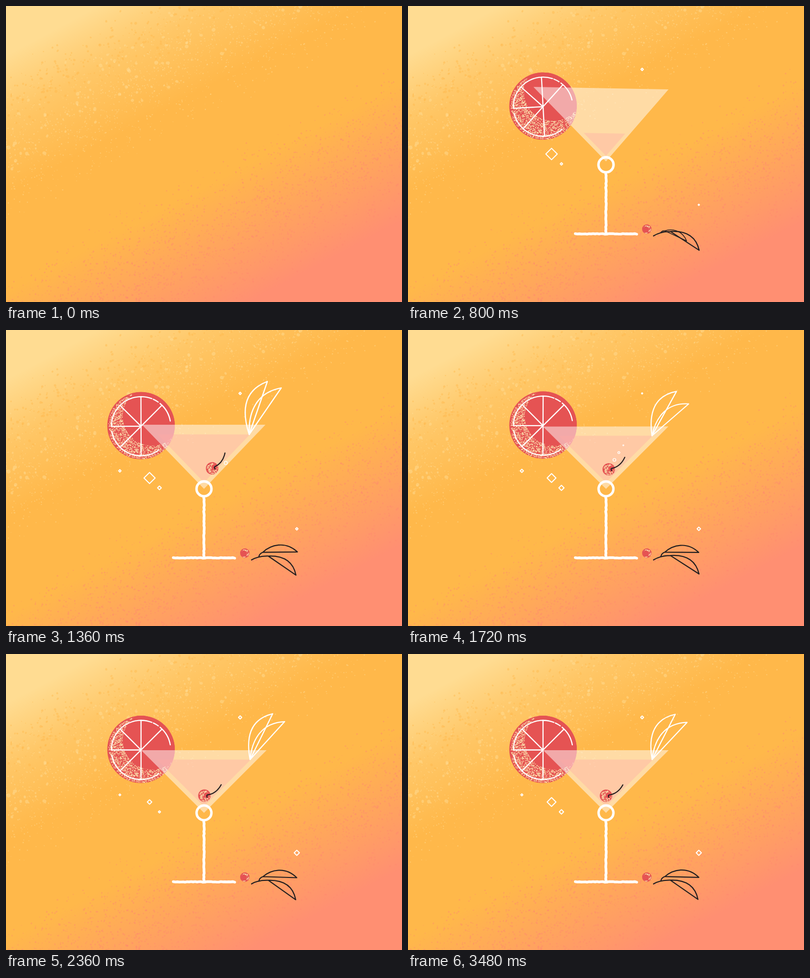
Animation of 800x600 px, one loop 3.52 s. Source, as an HTML page with a canvas:

```html
<!DOCTYPE html>
<html lang="en">
<head>
<meta charset="utf-8">
<title>Cocktail</title>
<style>
html, body { margin: 0; width: 100%; height: 100%; overflow: hidden; background: #ffb84a; }
canvas, svg { position: absolute; left: 0; top: 0; width: 800px; height: 600px; display: block; }
</style>
</head>
<body>
<canvas id="bg" width="800" height="600"></canvas>
<svg id="stage" viewBox="0 0 800 600" fill="none" stroke-linecap="round" stroke-linejoin="round"></svg>
<script>
const LOOP = 3520, RED = '#e55353', INK = '#231f20', PALE = '#fbdcaa', WHITE = '#fff';
const stage = document.getElementById('stage');

function seeded(s) {
  return () => {
    s = (s + 0x6d2b79f5) | 0;
    let r = Math.imul(s ^ (s >>> 15), 1 | s);
    r = (r + Math.imul(r ^ (r >>> 7), 61 | r)) ^ r;
    return ((r ^ (r >>> 14)) >>> 0) / 4294967296;
  };
}

const clamp = (x, lo, hi) => Math.max(lo, Math.min(hi, x));
const mix = (a, b, u) => a + (b - a) * u;
function ramp(t, from, to) {
  const u = clamp((t - from) / (to - from), 0, 1);
  return u * u * (3 - 2 * u);
}
// Goes from 0 to 1 with a damped swing
function spring(t, from, decay, speed) {
  const u = Math.max(0, t - from) / 1000;
  return 1 - Math.exp(-decay * u) * Math.cos(speed * u);
}
const wave = (t, peak, period) => Math.cos(2 * Math.PI * (t - peak) / period);

function set(el, attrs) {
  for (const k in attrs) el.setAttribute(k, attrs[k]);
  return el;
}
function add(tag, attrs = {}, parent = stage) {
  const el = document.createElementNS('http://www.w3.org/2000/svg', tag);
  parent.appendChild(el);
  return set(el, attrs);
}
function show(el, on) { el.style.display = on ? '' : 'none'; }
function place(el, x, y, rot, scale) {
  show(el, scale > 0.01);
  el.setAttribute('transform', `translate(${x} ${y}) rotate(${rot}) scale(${scale})`);
}

function paintBackdrop() {
  const c = document.getElementById('bg').getContext('2d'), rnd = seeded(11);
  const nx = 0.47, ny = 0.883;
  const g = c.createLinearGradient(0, 0, nx * 800, ny * 800);
  [[0.11, '#ffdc92'], [0.25, '#ffc767'], [0.42, '#ffb84a'], [0.64, '#ffb84a'], [0.95, '#ff8f72']]
    .forEach(([p, col]) => g.addColorStop(p, col));
  c.fillStyle = g;
  c.fillRect(0, 0, 800, 600);
  const band = (tries, lo, peak, hi, col, size) => {
    c.fillStyle = col;
    for (let i = 0; i < tries; i++) {
      const x = rnd() * 800, y = rnd() * 600, d = nx * x + ny * y;
      const p = d < peak ? (d - lo) / (peak - lo) : (hi - d) / (hi - peak);
      if (rnd() > p) continue;
      const r = size(d);
      c.beginPath();
      c.ellipse(x, y, r, r * (0.7 + 0.3 * rnd()), rnd() * 3, 0, 7);
      c.fill();
    }
  };
  band(4000, 110, 175, 250, 'rgba(255,184,74,.42)', () => 0.8 + 2.2 * rnd());
  band(10000, 150, 255, 400, 'rgba(255,222,150,.45)',
    d => 0.5 + rnd() + (d < 300 && rnd() < 0.13 ? 3.2 * rnd() : 0));
  band(10000, 470, 620, 760, 'rgba(255,136,112,.42)', () => 0.6 + 1.4 * rnd());
}

// Grainy disc with a smooth round patch
function fruit(R, count, px, py, pr, seed) {
  const rnd = seeded(seed), g = add('g'), id = 'disc' + seed;
  let d = '';
  for (let i = 0; i < count; i++) {
    const r = (R - 1.6) * Math.sqrt(rnd()), a = 2 * Math.PI * rnd(), s = (1 + 0.9 * rnd()).toFixed(1);
    d += `M${(r * Math.cos(a)).toFixed(1)} ${(r * Math.sin(a)).toFixed(1)}h${s}v${s}h-${s}z`;
  }
  add('circle', { r: R }, add('clipPath', { id }, g));
  add('circle', { r: R, fill: RED }, g);
  add('path', { d, fill: PALE }, g);
  const patch = add('circle', { cx: px, cy: py, r: pr, fill: RED }, add('g', { 'clip-path': `url(#${id})` }, g));
  return { g, patch };
}

function polar(r, deg) {
  const a = deg * Math.PI / 180;
  return `${(r * Math.cos(a)).toFixed(2)} ${(r * Math.sin(a)).toFixed(2)}`;
}
const arc = (r, a, b) => `M${polar(r, a)}A${r} ${r} 0 ${b - a > 180 ? 1 : 0} 1 ${polar(r, b)}`;
const poly = pts => 'M' + pts.map(p => p.join(' ')).join('L') + 'Z';

// Hand-drawn horizontal line; turned upright for the stem
function rough(from, to, seed) {
  const rnd = seeded(seed), pts = [];
  for (let x = from; x <= to; x += 4) pts.push(`${x} ${((rnd() - 0.5) * 1.4).toFixed(2)}`);
  return 'M' + pts.join('L');
}

paintBackdrop();

const slice = fruit(68.2, 2950, 22, -18, 59, 5);
const rim = arc(60, -50, -10) + arc(60, -65.5, -54.5) + arc(60, -180, -68.5) + arc(60, 53, 170);
let spokes = '';
for (let a = 90; a < 360; a += 45) spokes += `M0 0L${polar(60, a)}`;
add('path', { d: rim + spokes, stroke: WHITE, 'stroke-width': 2.3, transform: 'translate(0 1.2)' }, slice.g);

const bowl = add('path', { fill: WHITE, 'fill-opacity': 0.5 });
const drink = add('path', { fill: '#ffa8a4', 'fill-opacity': 0.36 });
const stem = add('path', { d: rough(0, 122, 3), stroke: WHITE, 'stroke-width': 5.4, pathLength: 1,
  transform: 'translate(400 460) rotate(-90)' });
const base = add('path', { d: rough(-62, 62, 8), stroke: WHITE, 'stroke-width': 5.4 });
const knob = add('circle', { cx: 400, stroke: WHITE });

const cherry = fruit(12.6, 105, 5, -1, 6, 21).g;
add('path', { d: 'M5.5 3C4.5 1 4.5 -1 6 -1.5C18 -3 28 -11 34 -22', stroke: INK, 'stroke-width': 2.2 }, cherry);
const berry = fruit(9.6, 60, -2, 1, 6.4, 33).g;

const leaf = (d, stroke, parent) => add('path', { d, stroke, 'stroke-width': 2.2 }, parent);
const sprig = add('g');
leaf('M0 0Q14 -8.5 34 -8.3C59 -9.5 84 -3 91 30L34 -8.3', INK, sprig);
const twig = leaf('M0 0C1 -5 4 -7 8 -8.5C24 -23 53 -31 77 -8L8 -8.5', INK, sprig);
const leafA = leaf('M0 0C-6 -42 2 -80 49 -89Z', WHITE);
const leafB = leaf('M0 0C6 -42 28 -72 72 -72Z', WHITE);

const sparks = [
  { x: 290, y: 300, mid: 9.2, amp: 4, peak: 1050, period: 3100, from: 100 },
  { x: 310, y: 320, mid: 4.8, amp: 1.6, peak: 1720, period: 1500, from: 320 },
  { x: 473, y: 128.5, mid: 3.4, amp: 1, peak: 1080, period: 1280, from: 300 },
  { x: 587.5, y: 403, mid: 4.7, amp: 2.3, peak: 2900, period: 4600, from: 300 },
  { x: 230, y: 285.5, mid: 3.7, amp: 0.7, peak: 1720, period: 1280, from: 850 }
];
for (const s of sparks) s.el = add('path', { stroke: WHITE });

const bubbles = [0, 1, 2, 3].map(i => ({
  x: 417 + 9 * i, from: 1630 - 105 * i, el: add('circle', { stroke: WHITE })
}));

// A leaf unfolds as it grows, then sways
function unfold(el, x, y, t, from, sway) {
  const s = t > from ? spring(t, from, 4, 6) : 0;
  place(el, x, y, 85 * (1 - s) + sway, s * (1 - 0.007 * sway));
}

function drawSlice(t) {
  const left = 1 - spring(t, 480, 5.5, 5.2), rise = 570 * left;
  place(slice.g, 272.8, 193.3 - rise, 184 * left, 1);
  set(slice.patch, { cy: -18 + clamp(rise, -22, 22) });
}

// Returns the right corner of the drink
function drawGlass(t) {
  const left = [400 - 127 * spring(t, 520, 5, 8), 298 - 103 * spring(t, 500, 4, 10.5)];
  const right = [400 + 126.5 * spring(t, 560, 4, 6.5), 298 - 103 * spring(t, 470, 4, 10.5)];
  const tip = [400, mix(288, 322, ramp(t, 560, 900))];
  show(bowl, t > 540);
  set(bowl, { d: poly([left, right, tip]) });

  const inset = ([x, y]) => [mix(400, x, 0.748), mix(270, y, 0.748)];
  const grow = ramp(t, 660, 980), low = inset(tip);
  const inner = [left, right].map(inset).map(([x, y]) => [mix(400, x, grow), mix(low[1], y, grow)]);
  show(drink, grow > 0);
  set(drink, { d: poly([...inner, low]) });

  const width = ramp(t, 60, 400), height = ramp(t, 160, 440);
  const r = t > 340 ? 15 * spring(t, 340, 5, 9.9) : 0;
  show(base, width > 0);
  set(base, { transform: `translate(400 462) scale(${width} 1)` });
  show(stem, height > 0);
  set(stem, { 'stroke-dasharray': `${height} 2` });
  set(knob, { cy: 322 - Math.max(0, r - 15) * 0.75, r, 'stroke-width': r / 3 });
  return inner[1];
}

function drawCherry(t) {
  const u = (t - 940) / 1000;
  const height = 356 * Math.exp(-5.5 * u) * Math.abs(Math.cos(4.2 * u));
  place(cherry, 400 + 58 * Math.exp(-3 * u), 287.3 - height, -93 * Math.exp(-4 * u), u > 0 ? 1 : 0);
}

function drawSpark(s, t) {
  const h = ramp(t, s.from, s.from + 450) * (s.mid + s.amp * wave(t, s.peak, s.period));
  const q = Math.max(h - 1.1, 0.2);
  show(s.el, h > 0.3);
  set(s.el, {
    d: poly([[s.x - q, s.y], [s.x, s.y - q], [s.x + q, s.y], [s.x, s.y + q]]),
    'stroke-width': Math.min(2, h)
  });
}

function drawBubble(b, t) {
  const cy = 276 - (t - b.from) * 0.14, r = Math.max(0, (cy - 214) / 17);
  show(b.el, t > b.from && r > 0.2);
  set(b.el, { cx: b.x, cy, r, 'stroke-width': Math.min(1.4, r) });
}

function draw(t) {
  const sway = 1.5 * ramp(t, 1300, 1700) * wave(t, 2360, 1280);
  drawSlice(t);
  const [x, y] = drawGlass(t);
  drawCherry(t);
  place(berry, 482.5, 452.3, 0, t > 400 ? spring(t, 400, 9, 12) : 0);
  unfold(sprig, 496, 466, t, 535, sway);
  unfold(twig, 15, -7, t, 640, 0);
  unfold(leafA, x - 1.5, y, t, 1020, -1.7 * sway);
  unfold(leafB, x - 1.5, y, t, 838, -1.7 * sway);
  for (const s of sparks) drawSpark(s, t);
  for (const b of bubbles) drawBubble(b, t);
}

const start = performance.now();
function tick() {
  draw((performance.now() - start) % LOOP);
  requestAnimationFrame(tick);
}
tick();
</script>
</body>
</html>
```
